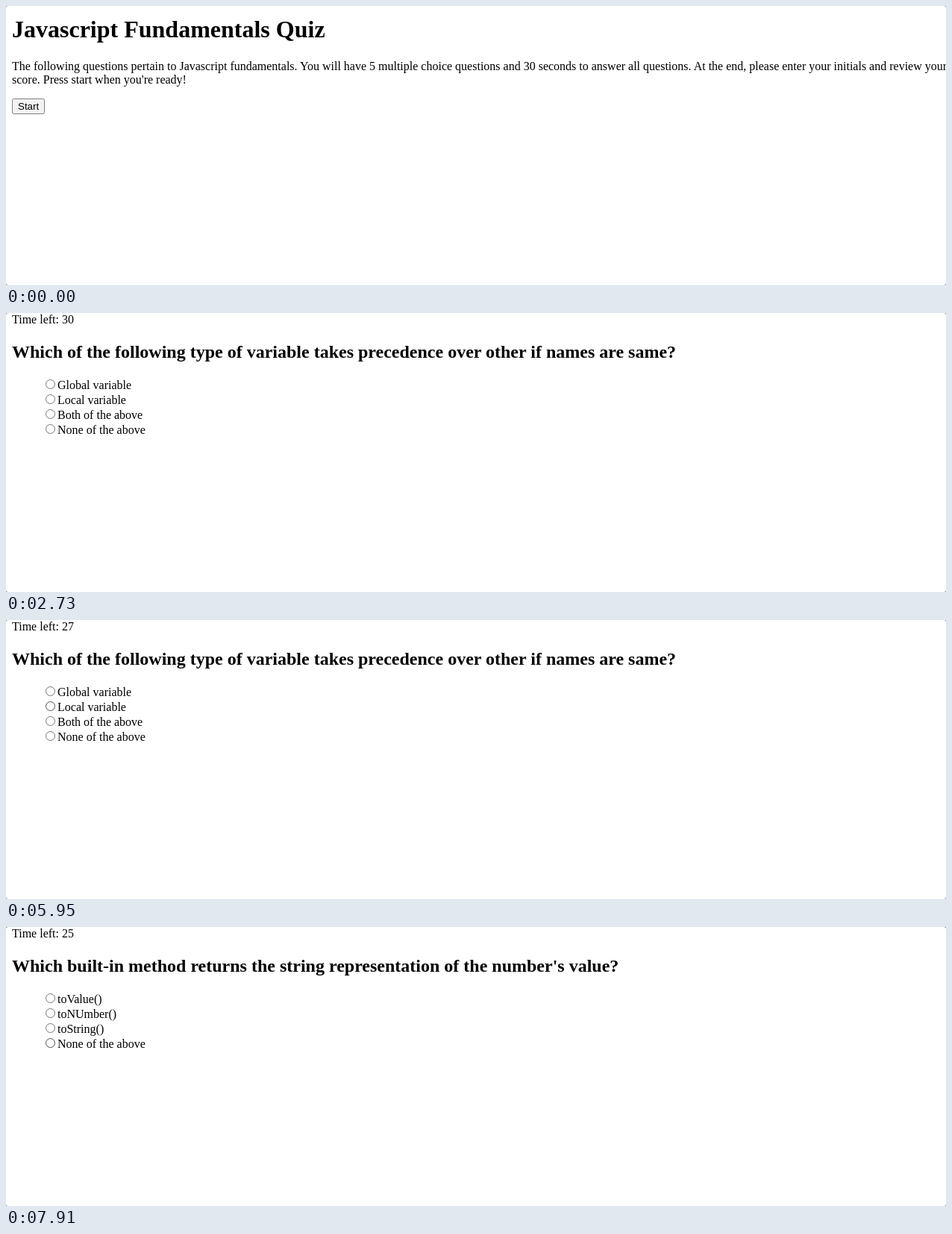
Write an HTML page that moves like this. It is 1260x374 px and loops after 8000 ms.

```html
<!DOCTYPE html>
<html lang="en">
<head>
<meta charset="utf-8">
<title>Quiz</title>
<style>
  html, body { margin: 0; width: 100%; height: 100%; overflow: hidden; background: #888; }
  svg { display: block; width: 1260px; height: 374px; background: #fff; border-radius: 3px; }
  text { font: 16px "Liberation Serif", Times, serif; white-space: pre; }
  .title { font-size: 32px; font-weight: bold; }
  .question { font-size: 24px; font-weight: bold; }
  .label { font: 13.333px "Liberation Sans", Arial, sans-serif; }
  .button { fill: #f3f3f3; stroke: #808080; }
  circle { fill: #fff; }
</style>
</head>
<body>
<svg viewBox="0 0 1260 374">
  <g id="intro">
    <text class="title" x="8" y="42">Javascript Fundamentals Quiz</text>
    <text x="8" y="86">The following questions pertain to Javascript fundamentals. You will have 5 multiple choice questions and 30 seconds to answer all questions. At the end, please enter your initials and review your</text>
    <text x="8" y="104">score. Press start when you're ready!</text>
    <rect class="button" x="8.5" y="124.5" width="43" height="20" rx="2"/>
    <text class="label" x="16" y="139">Start</text>
  </g>
  <g id="quiz">
    <text id="timer" x="8" y="14"></text>
    <text id="question" class="question" x="8" y="60"></text>
    <g id="options"></g>
  </g>
</svg>
<script>
const LOOP = 8000, QUIZ_START = 2730, NEXT_QUESTION = 6930;
const FIRST_TICK = 3750, TICK = 1030;
const COLORS = { idle: '#767676', hover: '#4f4f4f', pressed: '#8d8d8d' };

const questions = [
  { title: 'Which of the following type of variable takes precedence over other if names are same?',
    answers: ['Global variable', 'Local variable', 'Both of the above', 'None of the above'] },
  { title: "Which built-in method returns the string representation of the number's value?",
    answers: ['toValue()', 'toNUmber()', 'toString()', 'None of the above'] }
];

// Pointer path: [time, option under the pointer, state]
const pointer = [
  [0, -1], [3220, 2, 'hover'], [3290, -1], [3640, 0, 'hover'], [5740, 1, 'hover'],
  [5880, 2, 'hover'], [5950, 1, 'hover'], [6020, 0, 'hover'], [6160, -1],
  [6300, 1, 'hover'], [6790, 1, 'pressed'], [6930, 1, 'hover'], [7490, 3, 'hover']
];

const byId = id => document.getElementById(id);

function add(parent, tag, attributes) {
  const node = document.createElementNS('http://www.w3.org/2000/svg', tag);
  for (const name in attributes) node.setAttribute(name, attributes[name]);
  return parent.appendChild(node);
}

const options = [0, 1, 2, 3].map(i => ({
  radio: add(byId('options'), 'circle', { cx: 59.5, cy: 95.5 + 20 * i, r: 6 }),
  label: add(byId('options'), 'text', { x: 69, y: 102 + 20 * i })
}));

function setText(node, value) {
  if (node.textContent !== value) node.textContent = value;
}

function draw(time) {
  const started = time >= QUIZ_START;
  byId('intro').style.display = started ? 'none' : '';
  byId('quiz').style.display = started ? '' : 'none';

  const ticks = Math.max(0, Math.floor((time - FIRST_TICK) / TICK) + 1);
  setText(byId('timer'), 'Time left: ' + (30 - ticks));

  const { title, answers } = questions[time < NEXT_QUESTION ? 0 : 1];
  setText(byId('question'), title);

  const [, target, state] = pointer.filter(step => step[0] <= time).pop();
  options.forEach(({ radio, label }, i) => {
    setText(label, answers[i]);
    radio.setAttribute('stroke', COLORS[i === target ? state : 'idle']);
  });
}

const start = performance.now();
function loop() {
  draw((performance.now() - start) % LOOP);
  requestAnimationFrame(loop);
}
loop();
</script>
</body>
</html>
```
